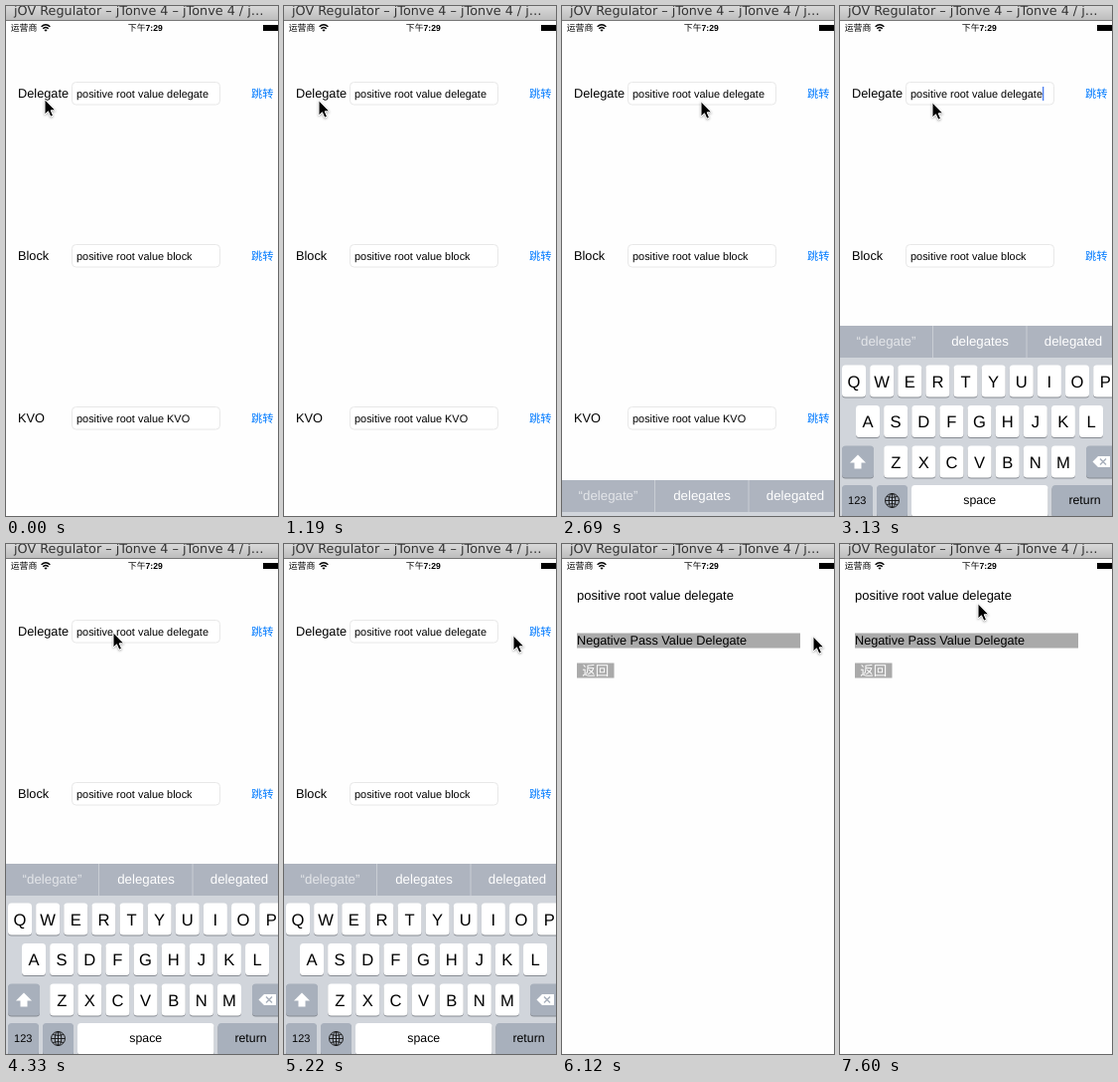
Recreate the animation shown at these times as an HTML page. Size 274 by 512 pixels, loop 8000 ms.

```html
<!DOCTYPE html>
<html lang="zh-CN">
<head>
<meta charset="utf-8">
<title>Passing values</title>
<style>
  html, body { margin: 0; width: 100%; height: 100%; overflow: hidden; background: #fefefe; }
  svg { display: block; width: 274px; height: 512px; }
  text {
    font-family: "Liberation Sans", sans-serif; font-size: 12.75px; fill: #000;
    white-space: pre; text-rendering: geometricPrecision;
  }
  .cjk { font-family: "Noto Sans CJK SC", "Noto Sans CJK", "Noto Sans CJK JP", sans-serif; }
  .window { font: 12.8px "DejaVu Sans", sans-serif; fill: #333; }
  .small { font-size: 8.9px; }
  .input { font-size: 10.93px; }
  .link { font-size: 11.25px; fill: #007aff; }
  .mid { text-anchor: middle; }
  .letter { font-size: 16.6px; }
  .word { font-size: 12.3px; }
  .hint { font-size: 13.3px; fill: #fff; }
  .light { fill: #fff; }
  .field { fill: #fff; stroke: #e8e8e8; }
</style>
</head>
<body>
<svg viewBox="0 0 274 512">
  <defs>
    <linearGradient id="chrome" x2="0" y2="1">
      <stop stop-color="#d9d9d9"/><stop offset="1" stop-color="#bdbdbd"/>
    </linearGradient>
  </defs>
  <rect width="274" height="512" fill="#fefefe"/>
  <g id="rows"></g>
  <rect id="caret" x="204" y="81" width="1.3" height="14" fill="#4a7df0"/>

  <g id="sheet">
    <rect y="15" width="274" height="512" fill="#fefefe"/>
    <text x="15" y="56.3" style="font-size:12.98px">positive root value delegate</text>
    <rect x="15" y="89.5" width="225" height="15" fill="#aaa"/>
    <text x="15" y="101.2" style="font-size:12.7px">Negative Pass Value Delegate</text>
    <rect x="15" y="119.5" width="37.5" height="15" fill="#aaa"/>
    <text class="cjk light" x="20.2" y="132" style="font-size:13.5px">返回</text>
  </g>

  <g id="keyboard"></g>

  <rect width="274" height="14" fill="url(#chrome)"/>
  <rect y="14" width="274" height="1" fill="#777"/>
  <text class="window" x="8" y="9.4">jOV Regulator – jTonve 4 – jTonve 4 / j…</text>

  <text class="cjk small" x="4.7" y="25.4">运营商</text>
  <path d="M35.6 20.8Q40 16.6 44.4 20.8M37.3 22.8Q40 20.3 42.7 22.8" fill="none" stroke="#000" stroke-width="1.4"/>
  <path d="M38.4 24.1Q40 22.7 41.6 24.1L40 25.8Z"/>
  <text class="cjk small" x="122.8" y="25.4">下午<tspan style="font:bold 8.6px 'Liberation Sans',sans-serif">7:29</tspan></text>
  <rect x="259" y="19" width="15" height="6"/>

  <path id="pointer" d="M0 -.3V15L3.500 11.800 5.900 17.200 8.500 16.100 6.200 10.800H10.900Z" stroke="#fff" stroke-width="1"
        style="filter:drop-shadow(0 1px 1px rgba(0,0,0,.3))"/>
</svg>

<script>
const $ = id => document.getElementById(id);
const LOOP = 8000;

// Bursts of movement: start, end, number of steps.
const bursts = [
  [150, 890, 6], [1190, 2090, 7], [2240, 3280, 8], [3430, 4330, 7],
  [4630, 5370, 6], [5670, 6570, 7], [6870, 7600, 6]
];

// Pointer path: time, x, y.
const path = [
  [0, 39, 94], [450, 22, 84], [890, 7, 95], [1040, 7, 95], [2090, 203, 95],
  [3130, 93, 97], [3280, 73, 97], [4330, 108, 89], [4480, 108, 89],
  [5370, 255, 92], [5670, 255, 92], [6120, 253, 93], [6570, 18, 58],
  [6720, 18, 58], [7600, 139, 60], [LOOP, 139, 60]
];

const text = (cls, x, y, s) => `<text class="${cls}" x="${x}" y="${y}">${s}</text>`;

function row(label, value, y) {
  return text("", 12, y + 4.2, label) +
    `<rect class="field" x="66.5" y="${y - 11.5}" width="149" height="22.5" rx="4"/>` +
    text("input", 71, y + 3.6, value) +
    text("cjk link", 247, y + 4.4, "跳转");
}

function key(x, y, w, cls, label, fill = "#fff") {
  return `<rect x="${x}" y="${y + 1}" width="${w}" height="32" rx="3.5" fill="#888c93"/>` +
    `<rect x="${x}" y="${y}" width="${w}" height="32" rx="3.5" fill="${fill}"/>` +
    text("mid " + cls, x + w / 2, y + (cls === "letter" ? 22 : 19), label);
}

function letters(chars, x, y) {
  return [...chars].map((c, i) => key(x + i * 28.13, y, 24, "letter", c)).join("");
}

function drawKeyboard() {
  const gray = "#a8b0bc";
  return `<rect y="321" width="274" height="194" fill="#d1d5db"/>
    <rect y="321" width="274" height="32" fill="#aeb4bf"/>
    <path d="M93.5 321v32M188 321v32" stroke="#c9cdd4"/>` +
    `<g opacity=".65">${text("mid hint", 46.5, 340.5, "“delegate”")}</g>` +
    text("mid hint", 141, 340.5, "delegates") +
    text("mid hint", 235, 340.5, "delegated") +
    letters("QWERTYUIOP", 2, 360.5) +
    letters("ASDFGHJKL", 16, 401) +
    letters("ZXCVBNM", 44.2, 441.5) +
    key(2, 441.5, 32, "", "", gray) +
    key(248, 441.5, 32, "", "", gray) +
    key(2, 481, 31, "", "", gray) +
    text("mid", 17.3, 500.3, `<tspan style="font-size:11px">123</tspan>`) +
    key(37, 481, 31, "", "", gray) +
    key(72, 481, 137.5, "word", "space") +
    key(213.5, 481, 66, "word", "return", gray) +
    `<path d="M18 450.5l8 8h-4.5v6h-7v-6H10Z" fill="#fff"/>
    <path d="M254.5 457.5l5.5-5.5h12v11h-12Z" fill="#fff"/>
    <path d="M262 454.5l6 6m0-6l-6 6" stroke="${gray}" stroke-width="1.5"/>
    <g fill="none" stroke="#111" stroke-width=".9">
      <circle cx="52.5" cy="496.5" r="7"/><ellipse cx="52.5" cy="496.5" rx="3.3" ry="7"/>
      <path d="M52.5 489.5v14M45.5 496.5h14M47 492.5q5.5 2 11 0M47 500.5q5.5-2 11 0"/>
    </g>`;
}

// Hold the picture between steps.
function snap(t) {
  let at = 0;
  for (const [start, end, n] of bursts) {
    if (t < start) break;
    const step = (end - start) / (n - 1);
    at = start + Math.min(n - 1, Math.floor((t - start + 4) / step)) * step;
  }
  return at;
}

function pointerAt(t) {
  const i = path.findIndex(p => p[0] > t);
  const [a, b] = [path[i - 1], path[i]];
  const k = (t - a[0]) / (b[0] - a[0]);
  return [1, 2].map(j => Math.round(a[j] + (b[j] - a[j]) * k));
}

// Remaining share of a critically damped spring released at the given time.
function spring(t, start) {
  const u = Math.max(0, t - start) * 0.01825;
  return (1 + u) * Math.exp(-u);
}

// The caret shows for half of each second and fades in just before.
function caretAt(t) {
  if (t < 2690 || t > 5700) return 0;
  const phase = (t - 2690) % 1000;
  return phase < 500 ? 1 : Math.max(0, (phase - 950) / 100);
}

const shift = (el, y) => el.setAttribute("transform", `translate(0 ${Math.round(y)})`);

function draw(t) {
  $("pointer").setAttribute("transform", `translate(${pointerAt(t)})`);
  shift($("keyboard"), 194 * (t < 5400 ? spring(t, 2640) : 1 - spring(t, 5483)));
  shift($("sheet"), 500 * spring(t, 5591.6));
  $("caret").style.opacity = caretAt(t);
  link.style.opacity = t > 5600 && t < 5800 ? 0.65 : 1;
}

$("rows").innerHTML = ["delegate", "block", "KVO"].map((name, i) =>
  row(name[0].toUpperCase() + name.slice(1), "positive root value " + name, 88 + 163 * i)).join("");
$("keyboard").innerHTML = drawKeyboard();
const link = document.querySelector(".link");

const begin = performance.now();
function tick() {
  draw(snap((performance.now() - begin) % LOOP));
  requestAnimationFrame(tick);
}
tick();
</script>
</body>
</html>
```
